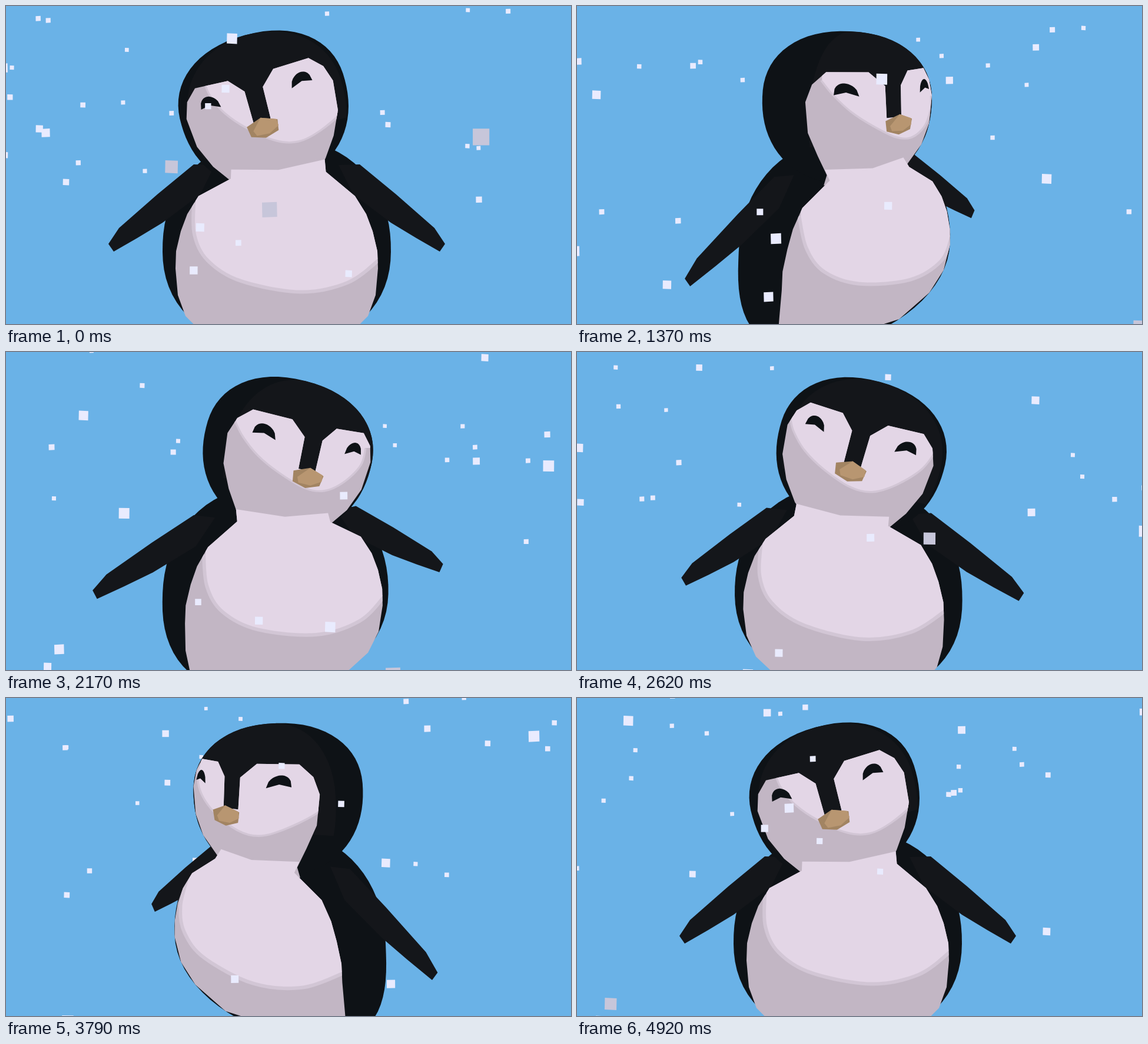
These frames come from a looping animation (960 by 540 pixels, 4960 ms). An HTML page with a canvas:

```html
<!DOCTYPE html>
<html lang="en">
<head>
<meta charset="utf-8">
<title>Penguin in the snow</title>
<style>
html, body { margin: 0; width: 100%; height: 100%; overflow: hidden; background: #6ab2e7; }
canvas { display: block; width: 960px; height: 540px; }
</style>
</head>
<body>
<canvas id="stage" width="960" height="540"></canvas>
<script>
const ctx = document.getElementById('stage').getContext('2d');
const { PI, sin, cos, abs, min, max, floor, sqrt } = Math;
const LOOP = 4960, FRAME = 125 / 3, LAST = 118;
const SKY = '#6ab2e7', INK = '#0e1216', INK_LIT = '#14161a';
const WHITE = '#e3d6e6', SHADE = '#c2b6c4', EDGE = '#d2c6d5';
const BEAK = '#a28462', BEAK_LIT = '#b89671', SNOW = '#e9ebfe', SNOW_DIM = '#c7c6da';

// Camera: it swings around a vertical axis and sees the horizon above the stage.
const AXIS = 460, HORIZON = -60, DEPTH = 1300;
const SWING = 0.6, NOD = 0.27, FLAP = 0.16, BACK = 10;
const PIVOT = [458, 250];

const clamp = (v, limit) => max(-limit, min(limit, v));
const scaleAt = depth => DEPTH / (DEPTH + depth);
const mirror = half => [...half, ...half.map(([x, y]) => [-x, y]).reverse()];

function poseAt(turn) {
  const yaw = SWING * sin(turn);
  return {
    yaw,
    headYaw: yaw - 0.07 * cos(turn),
    roll: -NOD * cos(turn),
    lift: FLAP * (1 - cos(4 * turn))
  };
}

function project(x, y, z, yaw) {
  const scale = scaleAt(x * sin(yaw) + z * cos(yaw));
  return [AXIS + (x * cos(yaw) - z * sin(yaw)) * scale, HORIZON + (y - HORIZON) * scale, scale];
}

function spin([x, y], angle, [px, py] = PIVOT) {
  const dx = x - px, dy = y - py, c = cos(angle), s = sin(angle);
  return [px + dx * c - dy * s, py + dx * s + dy * c];
}

// Half width of an egg at height y.
const egg = (middle, width, up, down) => y => {
  const t = min(1, abs(y - middle) / (y < middle ? up : down));
  return width * (1 - t ** 2.2) ** (1 / 2.2);
};
const headWidth = egg(158, 144, 115, 145);
const bodyWidth = egg(415, 194, 191, 165);

// Front point of a round surface, kept on the visible side; x of ±Infinity gives the rim.
function onSurface(x, y, radius, squash, back, yaw) {
  const deep = radius * squash, c = cos(yaw), s = sin(yaw);
  const reach = Math.hypot(radius * c, deep * s), turn = Math.atan2(deep * s, radius * c);
  const angle = isFinite(x)
    ? clamp(Math.asin(clamp(x / radius, 1)) + turn, PI / 2)
    : Math.sign(x) * PI / 2;
  const own = angle - turn;
  const depth = radius * sin(own) * s - deep * cos(own) * c;
  return [AXIS + reach * sin(angle) - back * s, HORIZON + (y - HORIZON) * scaleAt(depth)];
}

const onHead = (pose, tilt = pose.roll) => ([x, y]) =>
  spin(onSurface(x, y, headWidth(y) || 1, 1, BACK, pose.headYaw), tilt);

const onBeak = pose => ([x, y]) => spin(onSurface(x, y, 160, 1, BACK, pose.headYaw), pose.roll);

// The body leans back at the bottom, and its neck follows half of the nod.
const onBody = pose => ([x, y]) => {
  const back = BACK + 45 * max(0, (y - 400) / 140) ** 2;
  const neck = isFinite(x) ? max(0, min(1, 1 - (y - 254) / 40)) : 0;
  return spin(onSurface(x, y, bodyWidth(y) || 1, 0.74, back, pose.yaw), 0.4 * pose.roll * neck);
};

// Vertical band of a surface between two x rules.
function band(top, bottom, left, right) {
  const steps = 36;
  const ys = Array.from({ length: steps + 1 }, (_, i) => top + (bottom - top) * (1 - cos(PI * i / steps)) / 2);
  return [...ys.map(y => [right(y), y]), ...ys.reverse().map(y => [left(y), y])];
}
const rim = (top, bottom) => band(top, bottom, () => -Infinity, () => Infinity);

const headRim = rim(43, 302), bodyRim = rim(225, 579);
const crown = band(43, 215, y => -0.87 * headWidth(y), y => 0.975 * headWidth(y));

// Right halves, from the middle outwards.
const face = mirror([[15, 163], [16, 115], [40, 95], [100, 98], [120, 118], [129, 145],
  [124, 192], [106, 228], [82, 261], [60, 290]]);
const belly = mirror([[0, 256], [80, 254], [81, 267], [133, 302], [152, 331], [163, 359],
  [171, 392], [172, 420], [168, 465], [155, 503], [118, 545]]);
const beak = mirror([[0, 155], [27, 164], [24, 180], [0, 186]]);
const beakLight = [[-18, 172], [0, 155], [25, 163], [26, 173], [8, 181], [-14, 180]];
const wing = [[141, 269], [203, 320], [268, 377], [286, 404], [277, 417], [237, 394], [194, 368], [130, 320], [105, 270]];
const faceLight = [[-105, 108], [-95, 128], [-72, 152], [-37, 174], [10, 196], [47, 202], [84, 192], [122, 172], [140, 150]];
const bellyLight = [[-138, 312], [-137, 355], [-115, 387], [-60, 409], [40, 424], [120, 421], [172, 404]];

function eye(side) {
  const steps = 14, middle = 0.628, half = 0.16, radius = headWidth(120);
  const arc = Array.from({ length: steps + 1 }, (_, i) => {
    const t = 2 * i / steps - 1;
    return [side * radius * sin(middle + half * t), 130 - 18 * sqrt(1 - t * t)];
  });
  return [...arc, [side * radius * sin(middle), 125]];
}
const eyes = [eye(-1), eye(1)];

function trace(pts) {
  ctx.beginPath();
  pts.forEach(p => ctx.lineTo(...p));
  ctx.closePath();
}

function fill(pts, color) {
  trace(pts);
  ctx.fillStyle = color;
  ctx.fill();
}

function curveThrough(pts) {
  const at = i => pts[max(0, min(pts.length - 1, i))];
  ctx.moveTo(...pts[0]);
  for (let i = 0; i < pts.length - 1; i++) {
    const [a, b, c, d] = [at(i - 1), at(i), at(i + 1), at(i + 2)];
    ctx.bezierCurveTo(b[0] + (c[0] - a[0]) / 6, b[1] + (c[1] - a[1]) / 6,
      c[0] - (d[0] - b[0]) / 6, c[1] - (d[1] - b[1]) / 6, c[0], c[1]);
  }
}

// White part: shaded below the edge, lit above it.
function fillLit(pts, edge, softness) {
  fill(pts, SHADE);
  ctx.save();
  ctx.clip();
  ctx.beginPath();
  curveThrough(edge);
  ctx.strokeStyle = EDGE;
  ctx.lineWidth = softness;
  ctx.stroke();
  ctx.lineTo(720, edge[edge.length - 1][1]);
  ctx.lineTo(720, 0);
  ctx.lineTo(edge[0][0], 0);
  ctx.fillStyle = WHITE;
  ctx.fill();
  ctx.restore();
}

function drawWing(side, pose) {
  fill(wing.map(p => {
    const [x, y] = spin(p, -pose.lift, wing[0]);
    return project(side * x, y, 0, pose.yaw).slice(0, 2);
  }), INK_LIT);
}

function drawPenguin(pose) {
  const head = onHead(pose), body = onBody(pose), bill = onBeak(pose);
  fill(bodyRim.map(body), INK);
  drawWing(-1, pose);
  drawWing(1, pose);
  fill(headRim.map(head), INK);
  fill(crown.map(head), INK_LIT);
  // the light stays put while the head nods
  fillLit(face.map(head), faceLight.map(onHead(pose, 0.35 * pose.roll)), 7);
  fillLit(belly.map(body), bellyLight.map(body), 12);
  eyes.forEach(e => fill(e.map(head), INK));
  fill(beak.map(bill), BEAK);
  fill(beakLight.map(bill), BEAK_LIT);
}

// Snow falls in the same space, each flake starting again at a new place.
const FLAKES = 84, FLAKE = 11, FALL = 120, TOP = -40, RANGE = 520, FRONT = 9.5;

const noise = n => { const v = sin(n * 127.1 + 11.7) * 43758.5453; return v - floor(v); };

function flakeAt(i, seconds, yaw) {
  const fallen = noise(i + 0.71) * RANGE + FALL * seconds, cycle = floor(fallen / RANGE);
  const seed = i + cycle * 101;
  const x = (noise(seed) - 0.5) * 2200, z = noise(seed + 0.37) * 1700 - 800;
  const [sx, sy, scale] = project(x, TOP + fallen - cycle * RANGE, z, yaw);
  return { x: sx, y: sy, size: FLAKE * scale, skew: 0.05 * sin(i * 2.4) };
}

function drawFlake({ x, y, size, skew }) {
  ctx.save();
  ctx.transform(1, skew, -skew / 2, 1, x, y);
  ctx.fillStyle = size > 19.6 ? SNOW_DIM : SNOW;
  ctx.fillRect(-size / 2, -size / 2, size, size);
  ctx.restore();
}

function draw() {
  const frame = min(LAST, floor((performance.now() % LOOP + 5) / FRAME));
  const pose = poseAt(2 * PI * frame / LAST);
  const snow = Array.from({ length: FLAKES }, (_, i) => flakeAt(i, frame * FRAME / 1000, pose.yaw))
    .filter(f => f.size > 5 && f.size < 42)
    .sort((a, b) => a.size - b.size);
  ctx.fillStyle = SKY;
  ctx.fillRect(0, 0, 960, 540);
  snow.filter(f => f.size < FRONT).forEach(drawFlake);
  drawPenguin(pose);
  snow.filter(f => f.size >= FRONT).forEach(drawFlake);
  requestAnimationFrame(draw);
}
draw();
</script>
</body>
</html>
```
